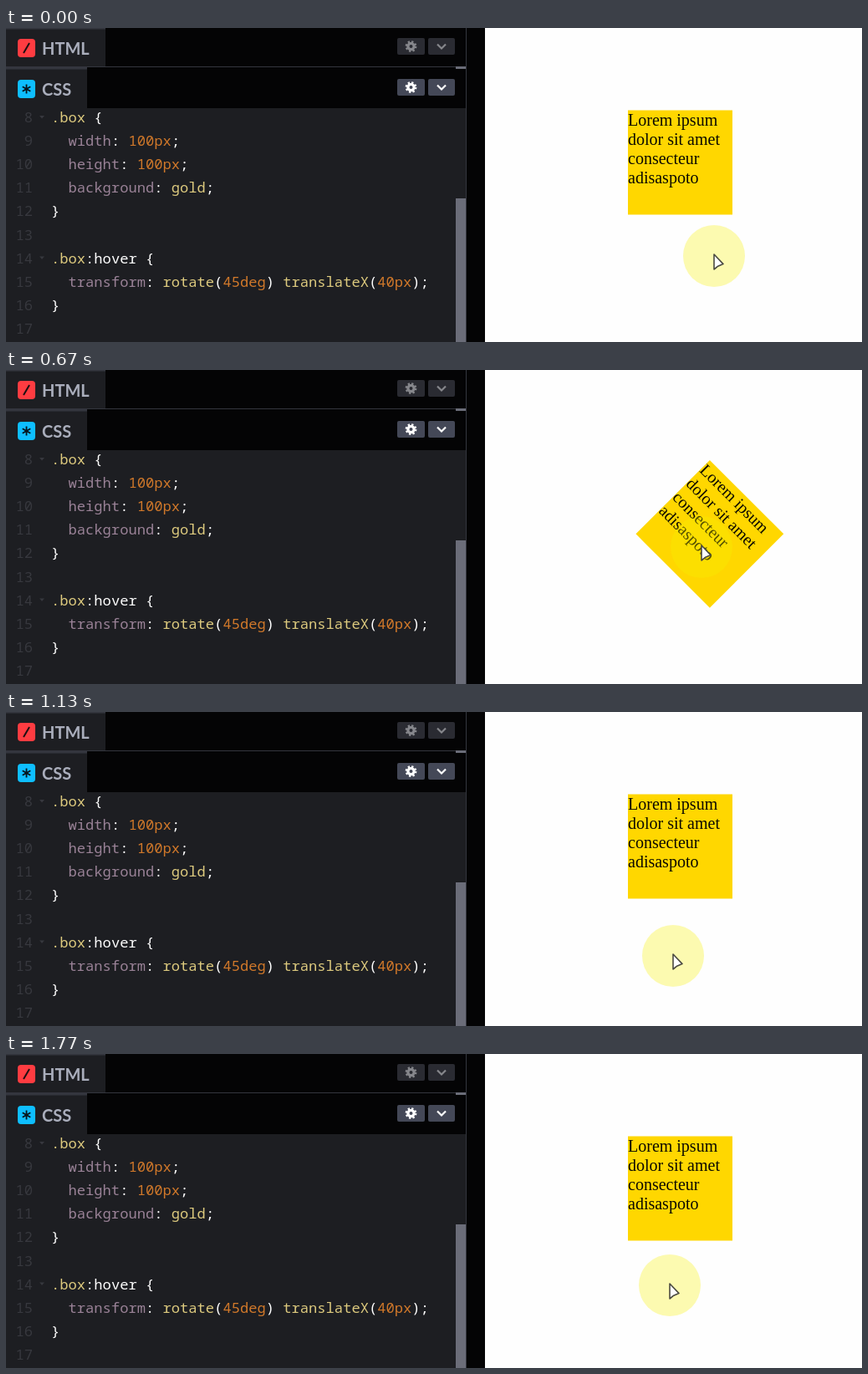
An HTML page that plays this animation: 1024x376 px, repeating every 1910 ms.

```html
<!DOCTYPE html>
<html lang="en">
<head>
<meta charset="utf-8">
<title>Hover transform</title>
<style>
html, body { margin: 0; width: 100%; height: 100%; overflow: hidden; background: #000; }
svg { display: block; width: 100%; height: 100%; }
text { white-space: pre; }
.tab { font: 700 20px Lato, sans-serif; fill: #aaaebc; }
.code { font: 17.11px "Noto Sans Mono", monospace; fill: #fff; }
.num { fill: #37383e; text-anchor: end; }
.sel { fill: #ddca7e; }
.prop { fill: #9a8297; }
.val { fill: #d0782a; }
.copy { font: 20px "Liberation Serif", serif; fill: #0c0a00; }
</style>
</head>
<body>
<svg viewBox="0 0 1024 376" preserveAspectRatio="none">
  <defs>
    <g id="gear">
      <circle r="3.6" fill="none" stroke="currentColor" stroke-width="3.2"/>
      <circle r="5.6" fill="none" stroke="currentColor" stroke-width="2.6" stroke-dasharray="2.2 2.198"/>
    </g>
    <path id="chevron" d="M-5-2.5 0 2.5 5-2.5" fill="none" stroke="currentColor" stroke-width="2.2"/>
    <g id="buttons">
      <rect x="468" width="33" height="20" rx="2"/>
      <rect x="505" width="32" height="20" rx="2"/>
      <use href="#gear" x="484.5" y="10"/>
      <use href="#chevron" x="521" y="10"/>
    </g>
  </defs>

  <rect width="1024" height="376" fill="#040405"/>
  <rect y="96" width="550" height="280" fill="#1d1e22"/>
  <g fill="#1d1e22">
    <rect width="119" height="46"/>
    <rect y="47" width="97" height="49"/>
  </g>
  <g fill="#34363e">
    <rect width="119" height="1.5"/>
    <rect y="46" width="550" height="1"/>
    <rect y="47" width="97" height="2.5"/>
    <rect x="550" width="1" height="376"/>
  </g>
  <g fill="#6b6d79">
    <rect x="538" y="46" width="12" height="3"/>
    <rect x="538" y="204" width="12" height="172"/>
  </g>

  <rect x="14" y="13" width="21" height="22" rx="4" fill="#ff3c41"/>
  <path d="M21 30 28 18" stroke="#1d1012" stroke-width="2"/>
  <text class="tab" x="43" y="32">HTML</text>
  <rect x="14" y="62" width="21" height="22" rx="4" fill="#0ebeff"/>
  <path d="M24.5 67.5v11M19.7 70.2l9.6 5.6M29.3 70.2l-9.6 5.6" stroke="#06141c" stroke-width="1.8"/>
  <text class="tab" x="43" y="81">CSS</text>
  <use href="#buttons" y="12" fill="#2a2b32" color="#86878c"/>
  <use href="#buttons" y="61" fill="#444857" color="#fff"/>

  <g id="code" class="code"></g>

  <rect x="573" width="451" height="376" fill="#fefefe"/>
  <g id="box">
    <rect x="744" y="98.5" width="125" height="125" fill="#ffd700"/>
    <g id="copy" class="copy"></g>
  </g>
  <g id="pointer">
    <circle r="37" fill="#f5ee00" fill-opacity=".31"/>
    <path d="M0-2V16L4.8 12.2 11 9.6Z" fill="#fff" stroke="#4b4a40" stroke-width="1.6" stroke-linejoin="round"/>
  </g>
</svg>
<script>
const $ = id => document.getElementById(id);
const LOOP = 1910, STEP = 100 / 3, LAST = 53;

// "s", "p" and "v" before a bar pick a colour; plain parts stay white
const lines = [
  ["s|.box", " {"],
  ["p|  width", ": ", "v|100px", ";"],
  ["p|  height", ": ", "v|100px", ";"],
  ["p|  background", ": ", "s|gold", ";"],
  ["}"],
  [],
  ["s|.box", ":hover {"],
  ["p|  transform", ": ", "s|rotate", "(", "v|45deg", ") ", "s|translateX", "(", "v|40px", ");"],
  ["}"],
  []
];
const tones = { s: "sel", p: "prop", v: "val" };

const span = part => {
  const [key, text] = part.includes("|") ? part.split("|") : ["", part];
  return `<tspan class="${tones[key] || ""}">${text}</tspan>`;
};

$("code").innerHTML = lines.map((parts, i) => {
  const y = 113 + i * 28.1;
  const fold = parts.at(-1)?.endsWith("{")
    ? `<path d="M40 ${y - 8}h6l-3 3.5z" fill="#37383e"/>` : "";
  return `<text class="num" x="32" y="${y}">${i + 8}</text>${fold}` +
    `<text x="54" y="${y}">${parts.map(span).join("")}</text>`;
}).join("");

$("copy").innerHTML = ["Lorem ipsum", "dolor sit amet", "consecteur", "adisaspoto"]
  .map((text, i) => `<text x="744" y="${117 + i * 23}">${text}</text>`).join("");

// Pointer path: tick, x, y
const path = [
  [0, 847, 273], [7, 844, 258], [12, 844, 258], [16, 841, 229], [18, 838, 214],
  [20, 832, 212], [22, 823, 237], [25, 807, 299], [28, 802, 337], [29, 801, 340],
  [31, 799, 334], [34, 798, 292], [37, 797, 212], [39, 796, 206], [42, 796, 226],
  [45, 795, 251], [48, 794, 273], [51, 794, 281], [LAST, 794, 277]
];
const hovers = [[17, 24], [37, 46]];

const slope = (i, k) => (path[i + 1][k] - path[i][k]) / (path[i + 1][0] - path[i][0]);

// Harmonic mean keeps the curve from overshooting its points
function tangent(i, k) {
  if (i === 0 || i === path.length - 1) return 0;
  const a = slope(i - 1, k), b = slope(i, k);
  return a * b > 0 ? 2 * a * b / (a + b) : 0;
}

function along(n, k) {
  let i = 0;
  while (i < path.length - 2 && path[i + 1][0] <= n) i++;
  const [p, q] = [path[i], path[i + 1]];
  const d = q[0] - p[0], u = (n - p[0]) / d, v = 1 - u;
  return p[k] * v * v * (1 + 2 * u) + q[k] * u * u * (3 - 2 * u) +
    d * u * v * (v * tangent(i, k) - u * tangent(i + 1, k));
}

function draw(ms) {
  const t = Math.floor((ms % LOOP) / 10) * 10;
  const n = Math.min(LAST, Math.floor((t + 5) / STEP));
  const turned = hovers.some(([from, to]) => n >= from && n < to);
  $("box").setAttribute("transform", turned ? "rotate(45 806.5 161) translate(50 0)" : "");
  $("pointer").setAttribute("transform", `translate(${along(n, 1)} ${along(n, 2)})`);
}

const start = performance.now();
function tick() {
  draw(performance.now() - start);
  requestAnimationFrame(tick);
}
tick();
</script>
</body>
</html>
```
